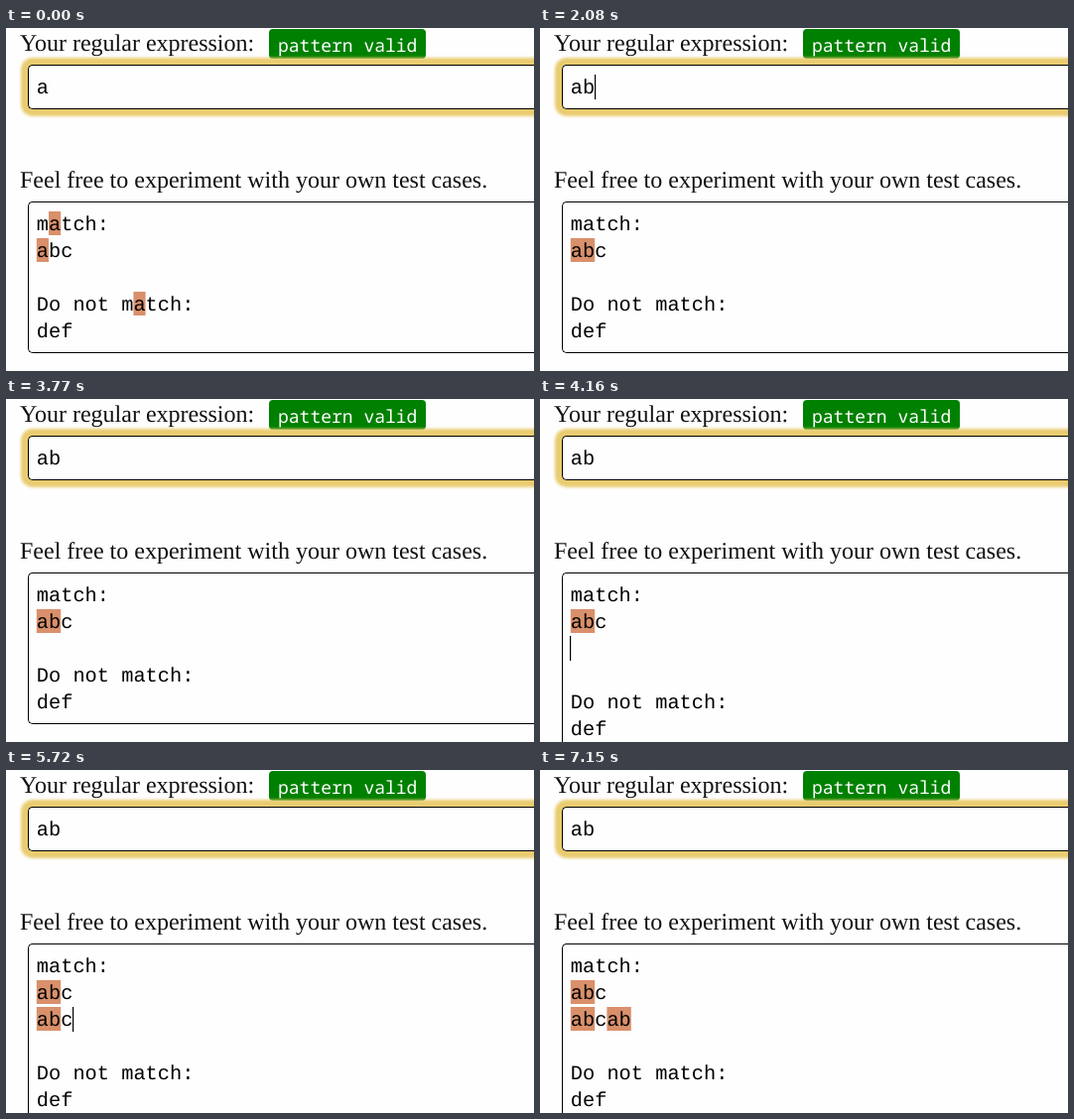
These frames come from a looping animation (532 by 346 pixels, 7670 ms). An HTML page:

```html
<!DOCTYPE html>
<html lang="en">
<head>
<meta charset="utf-8">
<title>Regular expression tester</title>
<style>
  html, body { margin: 0; width: 532px; height: 346px; overflow: hidden; background: #fefefe; }
  #stage { position: relative; width: 532px; height: 346px; overflow: hidden; contain: strict; }
  svg { position: absolute; left: 0; top: 0; }
  text { white-space: pre; text-rendering: geometricPrecision; }
  .label { font: 24px "Liberation Serif", "Times New Roman", serif; fill: #111; }
  .mono { font: 20.33px "Liberation Mono", "DejaVu Sans Mono", monospace; }
  .badge {
    position: absolute; left: 265px; top: 1px; width: 158px; height: 30px;
    border-radius: 4px; background: #008000;
  }
  .badge-text { font: 500 18px "Noto Sans Mono", "DejaVu Sans Mono", monospace; fill: #fff; }
  .box {
    position: absolute; left: 22px; right: 0; box-sizing: border-box;
    border: 1px solid #000; border-right: 0;
    border-radius: 5px 0 0 5px; background: #fefefe;
  }
  #pattern-box { top: 37px; height: 45px; box-shadow: 0 0 3px 7px #e9cc70; }
  #cases-box { top: 175px; }
</style>
</head>
<body>
<div id="stage">
  <div class="badge"></div>
  <div class="box" id="pattern-box"></div>
  <div class="box" id="cases-box"></div>
  <svg width="532" height="346" viewBox="0 0 532 346">
    <text class="label" x="14" y="23">Your regular expression:</text>
    <text class="badge-text" x="274" y="24">pattern valid</text>
    <text class="label" x="14" y="161">Feel free to experiment with your own test cases.</text>
    <g id="marks" fill="#d9906b"></g>
    <g id="lines"></g>
    <rect id="caret" width="1.2" height="25"></rect>
  </svg>
</div>
<script>
  const LOOP = 7670, LEFT = 30.8, PITCH = 12.2, ROW = 27;
  const PATTERN_Y = 66, CASES_Y = 204;

  // start time, pattern, added test line (null: none yet), caret row (-1: pattern box)
  const steps = [
    [0, "a", null, null],
    [1430, "a", null, -1],
    [2080, "ab", null, -1],
    [2730, "ab", null, null],
    [3250, "ab", null, 1],
    [3770, "ab", null, null],
    [4160, "ab", "", 2],
    [4680, "ab", "a", 2],
    [5070, "ab", "ab", 2],
    [5720, "ab", "abc", 2],
    [6240, "ab", "abca", 2],
    [6630, "ab", "abcab", 2],
    [7150, "ab", "abcab", null]
  ];

  const byId = id => document.getElementById(id);
  const marks = byId("marks"), lines = byId("lines"), caret = byId("caret");
  const casesBox = byId("cases-box");

  function add(parent, tag, attrs, text = "") {
    const node = document.createElementNS("http://www.w3.org/2000/svg", tag);
    for (const key in attrs) node.setAttribute(key, attrs[key]);
    node.textContent = text;
    parent.append(node);
  }

  function addLine(text, y) {
    add(lines, "text", { class: "mono", x: LEFT, y }, text);
  }

  function render([, pattern, added, caretRow]) {
    marks.replaceChildren();
    lines.replaceChildren();
    const rows = ["match:", "abc", ...(added === null ? [] : [added]), "", "Do not match:", "def"];

    addLine(pattern, PATTERN_Y);
    rows.forEach((row, i) => {
      const y = CASES_Y + i * ROW;
      for (const hit of row.matchAll(new RegExp(pattern, "g"))) {
        add(marks, "rect", {
          x: LEFT + hit.index * PITCH, y: y - 19,
          width: hit[0].length * PITCH, height: 24
        });
      }
      addLine(row, y);
    });
    casesBox.style.height = 18 + rows.length * ROW + "px";

    caret.style.display = caretRow === null ? "none" : "";
    if (caretRow !== null) {
      const inPattern = caretRow < 0;
      const text = inPattern ? pattern : rows[caretRow];
      caret.setAttribute("x", Math.floor(LEFT + text.length * PITCH));
      caret.setAttribute("y", (inPattern ? PATTERN_Y : CASES_Y + caretRow * ROW) - 19);
    }
  }

  let shown = null;
  const start = performance.now();

  function tick() {
    const t = (performance.now() - start) % LOOP;
    const step = steps.findLast(s => s[0] <= t);
    if (step !== shown) render(shown = step);
    requestAnimationFrame(tick);
  }
  tick();
</script>
</body>
</html>
```
